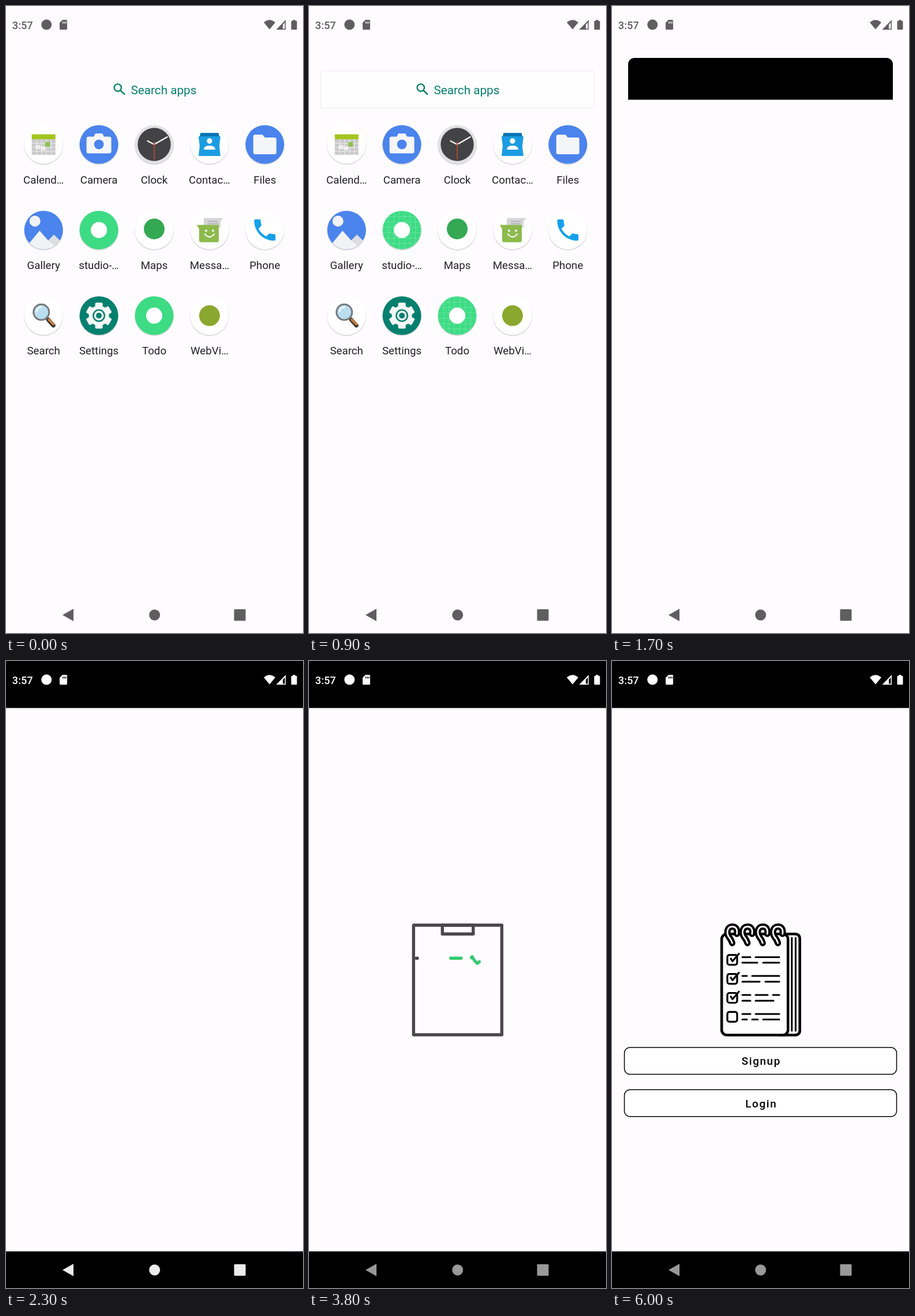
These frames come from a looping animation (515 px wide and 1087 px high, 8000 ms). An HTML page:

```html
<!DOCTYPE html>
<html lang="en">
<head>
<meta charset="utf-8">
<title>Todo app launch</title>
<style>
  html, body { margin: 0; width: 100%; height: 100%; overflow: hidden; background: #fefcff; }
  svg { display: block; width: 100%; height: 100%; font-family: Roboto, sans-serif; }
  .label { font-size: 18.7px; fill: #212123; text-anchor: middle; }
  .button { font-size: 18.8px; font-weight: 500; letter-spacing: 1.68px; text-anchor: middle; }
  .round { fill: none; stroke-linecap: round; stroke-linejoin: round; }
</style>
</head>
<body>
<svg viewBox="0 0 515 1087">
  <defs>
    <clipPath id="disc"><circle r="33.5"/></clipPath>
    <clipPath id="crop"><rect id="cropRect" width="515" height="515"/></clipPath>
    <path id="grid" stroke="#fff" stroke-opacity=".3" stroke-width=".7" fill="none"/>
  </defs>
  <rect width="515" height="1087" fill="#fefcff"/>

  <g id="launcher">
    <rect id="searchBox" x="20.5" y="112.5" width="474" height="64.5" rx="3" fill="#fefdff" stroke="#ebeaec"/>
    <g fill="none" stroke="#05806e" stroke-width="2.4">
      <circle cx="193.8" cy="141.6" r="6.2"/><path d="M198 146l8 7.5"/>
    </g>
    <text x="216.5" y="152.5" font-size="20.7" fill="#05806e">Search apps</text>
    <g id="apps"></g>
  </g>

  <g id="win" clip-path="url(#crop)">
    <rect width="515" height="1087" fill="#fefcff"/>
    <path d="M0 0h515v81.5H0zM0 1023.5h515v64H0z"/>
  </g>
  <g id="cover" clip-path="url(#crop)">
    <rect width="515" height="1087" fill="#3ddc84"/>
    <g id="coverArt"><use href="#grid"/><circle r="14" fill="#fff"/></g>
  </g>

  <g id="splash" class="round" stroke="#4a474b" stroke-width="5.4">
    <path id="board" d="M181.3 458H334.3V648H181.3Z"/>
    <path id="clip" d="M231.3 458V473.3H284.8V458Z"/>
    <g id="lines"></g>
    <g id="checks" stroke="#33c96f" stroke-width="5"></g>
    <path id="dash" stroke="#33c96f"/>
  </g>

  <g id="login">
    <g class="round" stroke="#000" stroke-width="4.6">
      <path d="M296 473.3H317Q325.700 473.300 325.700 482V640Q325.700 648.500 317 648.500H290" fill="#fff"/>
      <path d="M311.800 480V641M318.400 480V641" stroke-width="3"/>
      <rect x="190.200" y="473.300" width="115" height="175.200" rx="9" fill="#fff"/>
      <g id="rings"></g>
      <g id="boxes" stroke-width="3.200"></g>
      <path stroke-width="3" d="M226 513.5h14m9 0h41M226 523h26m10 0h28M226 546h8m9 0h47M226 556h30m10 0h24M226 579h14m9 0h21m9 0h11M226 589h14m9 0h31M226 612h14m9 0h41M226 621.500h8m9 0h10m9 0h28"/>
    </g>
    <g fill="#fff" stroke="#000" stroke-width="1.500">
      <rect x="21.500" y="670" width="472" height="46.500" rx="9.500"/>
      <rect x="21.500" y="743.300" width="472" height="46.500" rx="9.500"/>
    </g>
    <text class="button" x="258.800" y="700">Signup</text>
    <text class="button" x="258.800" y="773.500">Login</text>
  </g>

  <g id="status">
    <text x="10.800" y="39.500" font-size="18.200" font-weight="500">3:57</text>
    <circle cx="70.200" cy="32.300" r="9"/>
    <path fill-rule="evenodd" d="M98 24h6.500q1.500 0 1.500 1.500v14q0 1.500-1.500 1.500h-10q-1.500 0-1.500-1.500V29zM98 27v3.500h1.300V27zm2.700 0v3.500h1.300V27zm2.600 0v3.500h1.300V27z"/>
    <path d="M447 28.500q10-8.500 20 0L457 40.500z"/>
    <path fill-rule="evenodd" d="M485 24v17h-16.500zM483.500 28.500l-3.500 4v7h3.500z"/>
    <path d="M497.500 24h4v1.700h2q1 0 1 1V40q0 1-1 1h-8q-1 0-1-1V26.700q0-1 1-1h2z"/>
  </g>
  <g id="nav">
    <path d="M98 1055.700l19-10.700v21.500z"/>
    <circle cx="257.700" cy="1055.700" r="9.500"/>
    <rect x="395.500" y="1045.800" width="20" height="20" rx="1.500"/>
  </g>
</svg>
<script>
const LOOP = 8000, W = 515, H = 1087;
const $ = id => document.getElementById(id);
const set = (el, attrs) => { for (const k in attrs) el.setAttribute(k, attrs[k]); };
const show = (el, on) => el.setAttribute('display', on ? 'inline' : 'none');
const clamp = (v, a = 0, b = 1) => Math.min(b, Math.max(a, v));
const lerp = (a, b, p) => a + (b - a) * p;
const ramp = (t, start, dur) => clamp((t - start) / dur);
const inOut = p => p < .5 ? 2 * p * p : 1 - 2 * (1 - p) ** 2;
const grey = v => `rgb(${v},${v},${v})`;

// cubic-bezier(.2, 0, 0, 1)
function emphasized(x) {
  let lo = 0, hi = 1;
  for (let i = 0; i < 24; i++) {
    const u = (lo + hi) / 2;
    if (.6 * (1 - u) ** 2 * u + u ** 3 < x) lo = u; else hi = u;
  }
  return x >= 1 ? 1 : 3 * (1 - lo) * lo * lo + lo ** 3;
}

let gridPath = '';
for (let i = -5; i < 5; i++) {
  const p = ((i + .5) * 9.3).toFixed(2);
  gridPath += `M${p} -51V51M-51 ${p}H51`;
}
set($('grid'), { d: gridPath });

// App icons, drawn around their own centre
const BLUE = '#4a84ec', TEAL = '#05806f', GREEN = '#3ddc84';
const greenApp = '<use class="lattice" href="#grid"/><circle r="14" fill="#fff"/>';
const teeth = [0, 60, 120].map(a => `<rect x="-6.5" y="-22.500" width="13" height="45" rx="2" transform="rotate(${a})"/>`).join('');
const apps = [
  ['Calend…', '#fff', `<path fill="#c9c9c9" d="M-20.500-9h41v27h-41z"/><path fill="#a3c51c" d="M-20.500-17.500h41v8.500h-41z"/>
    <path stroke="#efefef" d="M-20.500-2h41m-41 7h41m-41 7h41M-12-9v27m8.500-27v27M5-9v27m8.500-27v27"/>
    <path fill="#efefef" d="M-14 1h8v7h-8zM-5 3h8v7h-8z"/><path fill="#8fc04a" d="M3-4h8v8H3z"/>`],
  ['Camera', BLUE, `<path fill="#f4f5f7" d="M-18-13.500h9l3-5.500H6l3 5.500h9q3.500 0 3.500 3.500v22q0 3.500-3.500 3.500h-36q-3.500 0-3.500-3.500v-22q0-3.500 3.500-3.500z"/>
    <circle r="11.500" fill="#fff"/><circle r="8.500" fill="${BLUE}"/>`],
  ['Clock', '#e2e2e5', `<circle r="28.700" fill="#434245"/><path class="round" stroke="#fff" stroke-width="2.200" d="M-11.500-6L0 0L22.500-13"/>
    <path stroke="#d2542f" stroke-width="1.300" d="M0-5V26"/><circle r="1.700" fill="#d2542f"/>`],
  ['Contac…', '#fff', `<path fill="#0874b4" d="M-15.500-20h31l3 11h-37z"/><path fill="#1b9ce2" d="M-19-14h38l-2 17 2 17h-38l2-17z"/>
    <circle cy="-6" r="4.700" fill="#fff"/><path fill="#fff" d="M-10 9q0-7 10-7t10 7z"/>`],
  ['Files', BLUE, '<path fill="#f4f5f7" d="M-17-17h13l4 5h17q3 0 3 3v23q0 3-3 3h-34q-3 0-3-3v-28q0-3 3-3z"/>'],
  ['Gallery', BLUE, '<circle cx="-15" cy="-15.500" r="9.500" fill="#f1f2f5"/><path fill="#f1f2f5" d="M-34 34L-7 1 8 18 18 8 40 30V36z"/><path fill="#dcdde1" d="M8 18L18 8 40 32 30 36z"/>'],
  ['studio-…', GREEN, greenApp],
  ['Maps', '#fff', '<circle cy="-2" r="18" fill="#34a853"/>'],
  ['Messa…', '#fff', `<path fill="#d6d6d8" d="M-10-21h34l-5 6V-4H-10z"/><path stroke="#aaa" stroke-width="1.500" d="M-3-15h17M-3-11h17"/>
    <path fill="#8cba4c" d="M-22-9h38v27q0 3-3 3h-28q-3 0-3-3V-2z"/><g fill="#fff"><circle cx="-6" cy="1" r="2"/><circle cx="6" cy="1" r="2"/></g>
    <path class="round" stroke="#fff" stroke-width="2.300" d="M-8 7q8 10 16 0"/>`],
  ['Phone', '#fff', `<path fill="#15a0ec" transform="scale(2.050)translate(-12-12)" d="M6.620 10.790c1.440 2.830 3.760 5.140 6.590 6.590l2.200-2.200c.27-.27.67-.36 1.020-.24 1.120.37 2.330.57 3.570.57.55 0 1 .45 1 1V20c0 .55-.45 1-1 1-9.390 0-17-7.610-17-17 0-.55.45-1 1-1h3.500c.55 0 1 .45 1 1 0 1.250.2 2.450.57 3.570.11.35.03.74-.25 1.020z"/>`],
  ['Search', '#fff', `<path class="round" stroke="#3c3432" stroke-width="7" d="M8 7L17 17"/><path class="round" stroke="#c9803f" stroke-width="4" d="M9 7L17 15"/>
    <circle cx="-4" cy="-6" r="13.500" fill="#b9def0" stroke="#77797d" stroke-width="3"/><path class="round" stroke="#eaf7fc" stroke-width="3" d="M-12-7q1-7 8-8"/>`],
  ['Settings', TEAL, `<g fill="#f5f7f7">${teeth}<circle r="17.500"/></g><circle r="9.700" fill="#f5f7f7" stroke="${TEAL}" stroke-width="2.500"/><circle r="5" fill="${TEAL}"/>`],
  ['Todo', GREEN, greenApp],
  ['WebVi…', '#fff', '<circle r="18" fill="#8aa82e"/>']
];
$('apps').innerHTML = apps.map(([name, color, art], i) => {
  const x = 65.200 + i % 5 * 95.900, y = 240 + Math.floor(i / 5) * 148.400;
  return `<g transform="translate(${x} ${y})"><g id="icon-${name}">
    <circle cy="1.300" r="34" fill="#d9d8dc"/><circle r="33.500" fill="${color}"/>
    <g clip-path="url(#disc)">${art}</g></g><text class="label" y="67.500">${name}</text></g>`;
}).join('');

const ring = 'd="M216.500 473C218 464 214 460.500 208.500 460.500C200 460.500 197.500 471 203 479Q206 482 208.500 489"';
$('rings').innerHTML = [0, 1, 2, 3].map(i => `<g transform="translate(${i * 26.400})">
  <path ${ring} stroke-width="11"/><path ${ring} stroke="#fff" stroke-width="2.800"/></g>`).join('');
$('boxes').innerHTML = [0, 1, 2, 3].map(i => `<g transform="translate(0 ${i * 32.900})">
  <rect x="200" y="509.700" width="17" height="17" rx="3.500"/>${i < 3 ? '<path d="M206 516l3 4.500L220 507.500"/>' : ''}</g>`).join('');

// Checklist: each row has a long and a short line
const addPath = (parent, d = '') => {
  const el = document.createElementNS('http://www.w3.org/2000/svg', 'path');
  set(el, { d });
  return $(parent).appendChild(el);
};
const lines = [];
for (let row = 0; row < 3; row++) for (const short of [0, 1]) {
  lines.push({
    el: addPath('lines'), y: 515.300 + row * 37 + short * 10.500,
    reach: short ? 50 : 82, start: 3747 + row * 320.500 + short * 184
  });
}
const checks = [[519.500, 3444, 450], [557.500, 3900, 700], [595, 4605, 950]].map(([y, start, dur]) => {
  const el = addPath('checks', 'M293-15C306-16 314-8 314 2C314 13 308 18 300 18C284 18 276-2 283-7Q286 0 292 5L303-4.500');
  set(el, { transform: `translate(0 ${y})` });
  return { el, start, dur, len: el.getTotalLength() };
});

function trim(el, len, a, b) {
  show(el, b > 0);
  set(el, { 'stroke-dasharray': `${b - a} ${len + 20}`, 'stroke-dashoffset': -a });
}

function drawLaunch(t) {
  const e = t - 1453;
  const p = emphasized(clamp(e / 500)), alpha = ramp(e, 0, 68);
  const detail = ramp(t, 50, 450);
  show($('launcher'), e < 217);
  set($('launcher'), {
    transform: `translate(0 ${-71 * emphasized(clamp(e / 350))})`,
    opacity: 1 - ramp(e, 0, 217)
  });
  set($('searchBox'), { opacity: detail });
  document.querySelectorAll('.lattice').forEach(el => set(el, { opacity: detail }));
  show($('icon-Todo'), e <= 0);

  const s = lerp(67, W, p) / W, h = lerp(W, H, p);
  const transform = `translate(${257.500 - W * s / 2} ${lerp(536.800, H / 2, p) - h * s / 2}) scale(${s})`;
  set($('cropRect'), { height: h, rx: W / 2 * (1 - emphasized(clamp(e / 375))) });
  show($('win'), e > 0);
  set($('win'), { transform, opacity: alpha });
  show($('cover'), e > 0 && alpha < 1);
  set($('cover'), { transform, opacity: 1 - alpha });
  set($('coverArt'), { transform: `translate(257.500 ${h / 2}) scale(${W / 67})` });

  const light = ramp(t, 1850, 130);
  set($('status'), { fill: grey(lerp(94, 255, light)) });
  set($('nav'), { fill: grey(lerp(94, 255, light) * lerp(1, .6, ramp(t, 2150, 800))) });
}

function drawSplash(t) {
  const fade = ramp(t, 5850, 130);
  show($('splash'), t > 3130 && fade < 1);
  set($('splash'), { opacity: 1 - fade });
  show($('login'), fade > 0);
  set($('login'), { opacity: fade });

  trim($('board'), 686, 0, 686 * inOut(ramp(t, 3130, 470)));
  trim($('clip'), 138, 0, 138 * inOut(ramp(t, 3300, 400)));
  for (const { el, y, reach, start } of lines) {
    const p = inOut(ramp(t, start, 440));
    show(el, p > 0);
    set(el, { d: `M${185.500 + 21 * p} ${y}H${185.500 + reach * p}` });
  }
  for (const { el, start, dur, len } of checks) {
    const head = len * inOut(ramp(t, start, dur));
    trim(el, len, Math.max(0, head - 22.500), head);
  }
  const x = 245.500 + (t - 3800) * .25;
  const a = clamp(x, 206, 284), b = clamp(x + 18, 206, 284);
  show($('dash'), b > a);
  set($('dash'), { d: `M${a} 515.300H${b}` });
}

function frame(now) {
  const t = now % LOOP;
  drawLaunch(t);
  drawSplash(t);
  requestAnimationFrame(frame);
}
frame(performance.now());
</script>
</body>
</html>
```
